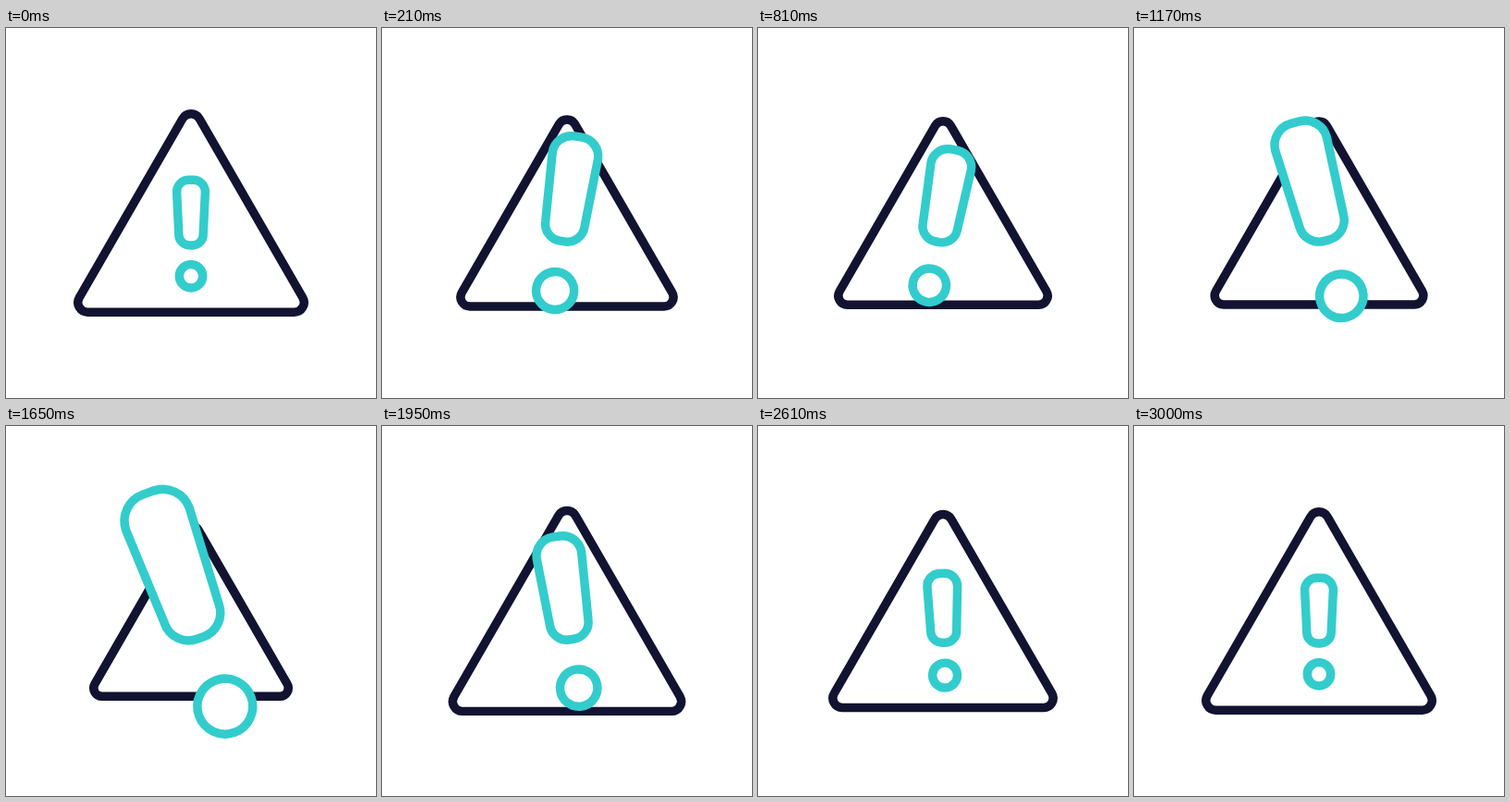
Recreate the animation shown at these times as an HTML page. Size 400 px wide and 400 px high, loop 5.03 s.

```html
<!DOCTYPE html>
<html lang="en">
<head>
<meta charset="utf-8">
<title>Warning icon</title>
<style>
  html, body { margin: 0; width: 100%; height: 100%; overflow: hidden; background: #fff; }
  svg { display: block; width: 100%; height: 100%; }
  g { fill: #fff; }
  #triangle { stroke: #121331; }
  #mark { stroke: #33cccc; }
</style>
</head>
<body>
<svg viewBox="0 0 400 400">
  <g id="triangle">
    <path d="M-9.1 -102A10.5 10.5 0 0 1 9.1 -102L120.8 91.5A10.5 10.5 0 0 1 111.7 107.2H-111.7A10.5 10.5 0 0 1 -120.8 91.5Z"/>
  </g>
  <g id="mark">
    <path d="M-2.6 -58.3H2.6A12.9 12.9 0 0 1 15.4 -45.4L13.2 .8A11.6 11.6 0 0 1 1.6 12.4H-1.6A11.6 11.6 0 0 1 -13.2 .8L-15.4 -45.4A12.9 12.9 0 0 1 -2.6 -58.3Z"/>
    <circle cy="45.8" r="12.7"/>
  </g>
</svg>
<script>
const LOOP = 5030, MOVE = 3000, STEP = 30, LINE = 9.45;

// Key poses as [ms, value]: swing right, swing left, overshoot, settle.
const triangleSize = [[0, 1], [470, .861], [950, .943], [1640, .861], [2205, 1.123], [2600, .975], [MOVE, 1]];
const markSize = [[0, 1], [450, 2.37], [920, 1.28], [1170, 1.866], [1640, 2.36], [2240, .89], [2620, 1.06], [MOVE, 1]];
const markAngle = [[0, 0], [460, 19.5], [810, 10.3], [1170, -14.9], [1640, -19.8], [2290, 4.6], [2660, -2], [MOVE, 0]];

const slope = (a, b) => (b[1] - a[1]) / (b[0] - a[0]);

// Flat at ends and turning points, smooth through the keys between them.
function tangent(keys, i) {
  if (i === 0 || i === keys.length - 1) return 0;
  const before = slope(keys[i - 1], keys[i]), after = slope(keys[i], keys[i + 1]);
  return before * after > 0 ? 2 * before * after / (before + after) : 0;
}

function valueAt(keys, t) {
  let i = 0;
  while (i < keys.length - 2 && t >= keys[i + 1][0]) i++;
  const [t0, v0] = keys[i], [t1, v1] = keys[i + 1];
  const span = t1 - t0, p = (t - t0) / span, q = 1 - p;
  return v0 * q * q * (1 + 2 * p) + v1 * p * p * (1 + 2 * q)
    + span * p * q * (tangent(keys, i) * q - tangent(keys, i + 1) * p);
}

function place(id, x, y, angle, size) {
  const node = document.getElementById(id);
  node.setAttribute("transform", `translate(${x} ${y}) rotate(${angle}) scale(${size})`);
  node.setAttribute("stroke-width", LINE / size);
}

function draw(now) {
  const t = Math.min(MOVE, Math.floor((now % LOOP) / STEP) * STEP);
  place("triangle", 200, 200, 0, valueAt(triangleSize, t));

  // The mark rises as it grows and drifts against its tilt when small.
  const size = valueAt(markSize, t), angle = valueAt(markAngle, t);
  const x = 200 - 17 * Math.sin(angle * Math.PI / 180) * (2.4 - size);
  const y = 222.5 - 24.5 * Math.log(Math.max(1, size));
  place("mark", x, y, angle, size);
}

const start = performance.now();
function tick() {
  draw(performance.now() - start);
  requestAnimationFrame(tick);
}
tick();
</script>
</body>
</html>
```
